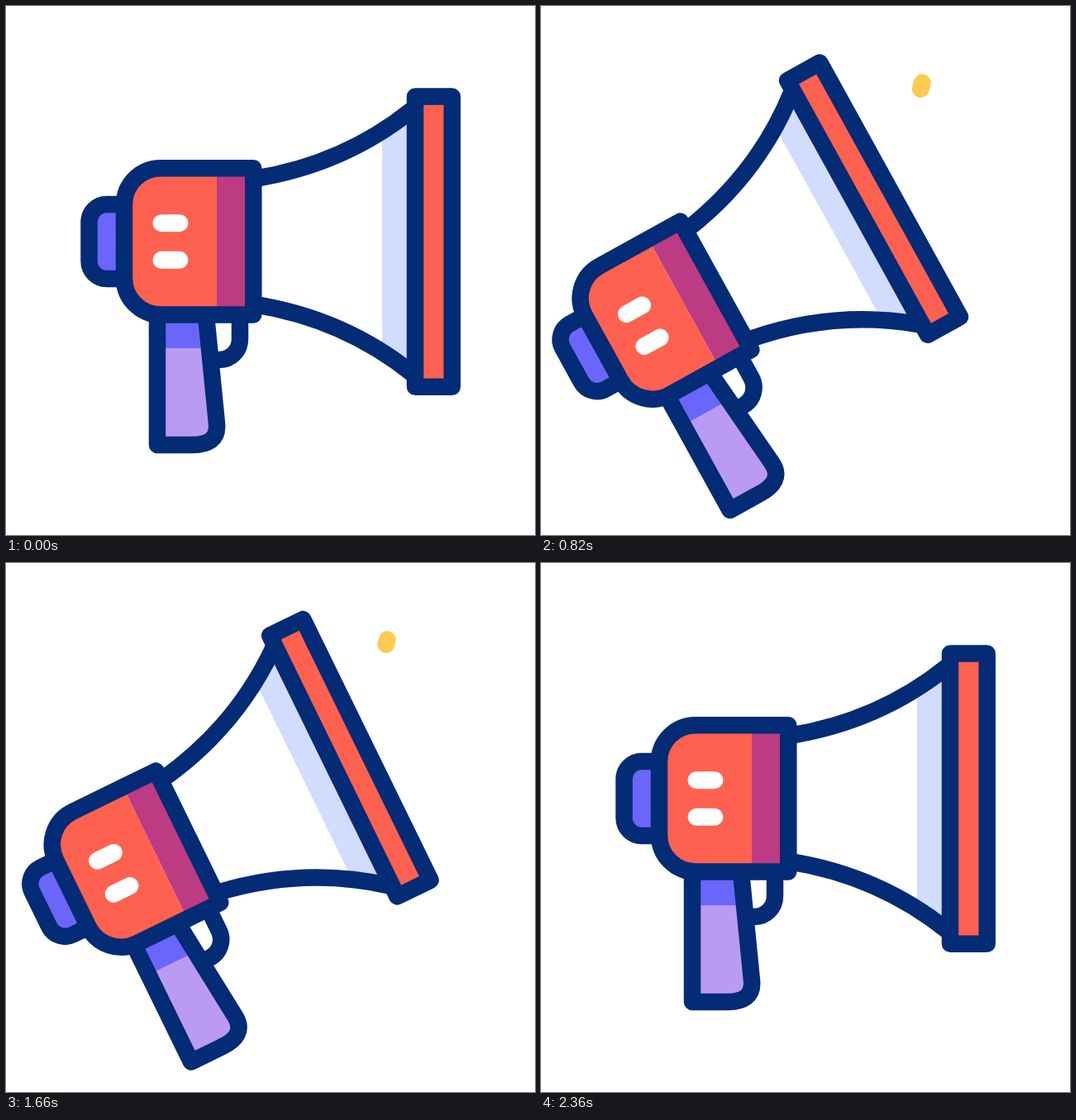
An HTML page for the animation above (2.4 s loop, 640x640 px).

```html
<!DOCTYPE html>
<html lang="en">
<head>
<meta charset="utf-8">
<title>Megaphone</title>
<style>
  html, body { margin: 0; width: 100%; height: 100%; overflow: hidden; background: #fff; }
  svg { display: block; width: 100%; height: 100%; }
  .line { fill: none; stroke: #042b75; stroke-width: 20.5; stroke-linejoin: round; }
  .ray { fill: none; stroke: #ffca50; stroke-width: 21; stroke-linecap: round; }
</style>
</head>
<body>
<svg viewBox="0 0 640 640">
  <defs>
    <clipPath id="grip">
      <path d="M183 374 V531 H226 C243 531 257 525 255 505 L242 374 Z"/>
    </clipPath>
    <clipPath id="cone">
      <path d="M300 209 C370 198 436 170 492 125 V445 C436 400 370 372 300 361 Z"/>
    </clipPath>
    <clipPath id="shell">
      <path d="M299.5 196 H187 A44 44 0 0 0 143 240 V329.5 A44 44 0 0 0 187 373.5 H299.5 Z"/>
    </clipPath>
  </defs>

  <path class="ray" d="M461.3 92.8 L446.5 149.5"/>
  <path class="ray" d="M494.5 227.3 L545.5 241"/>

  <g id="horn">
    <path class="line" d="M283 374 V403 C283 417 272 428 258 428 H250"/>
    <g clip-path="url(#grip)">
      <rect x="180" y="370" width="90" height="44" fill="#6b66fa"/>
      <rect x="180" y="414" width="90" height="120" fill="#bb9af3"/>
    </g>
    <path class="line" d="M242 374 L255 505 C257 525 243 531 226 531 H183 V374"/>

    <path class="line" style="fill:#6b66fa" d="M143 240 H122 A21.5 21.5 0 0 0 100.5 261.5 V308.5 A21.5 21.5 0 0 0 122 330 H143"/>

    <g clip-path="url(#cone)">
      <rect x="300" y="120" width="155" height="330" fill="#fff"/>
      <rect x="455" y="120" width="40" height="330" fill="#d2dcfd"/>
    </g>
    <path class="line" d="M300 209 C370 198 436 170 492 125 M300 361 C370 372 436 400 492 445"/>
    <rect class="line" style="fill:#ff6150" x="495" y="109.5" width="44.7" height="351.3"/>

    <g clip-path="url(#shell)">
      <rect x="140" y="190" width="115" height="190" fill="#ff6150"/>
      <rect x="255" y="190" width="50" height="190" fill="#bd3b83"/>
    </g>
    <path class="line" d="M299.3 196.2 H187 A44 44 0 0 0 143 240 V329.5 A44 44 0 0 0 187 373.5 H299.3 Z"/>
    <path d="M188 262.7 H210 M188 307.3 H210" stroke="#fff" stroke-width="21" stroke-linecap="round"/>
  </g>
</svg>
<script>
  const LOOP = 2400, TILT = 31.7;
  const UP = { start: 0, end: 1200 }, DOWN = { start: 1212, end: 2345 };
  const PULSE = { start: 784.5, step: 227, count: 4 };
  const horn = document.getElementById('horn');
  const rays = [...document.querySelectorAll('.ray')].map(el => ({ el, len: el.getTotalLength() }));
  const total = rays.reduce((sum, r) => sum + r.len, 0);

  const clamp = v => Math.min(1, Math.max(0, v));
  const smooth = u => u * u * (3 - 2 * u);
  const phase = (t, { start, end }) => (t - start) / (end - start);

  // cubic-bezier(.8, 0, .2, 1)
  function ease(x) {
    if (x <= 0) return 0;
    if (x >= 1) return 1;
    let lo = 0, hi = 1;
    for (let i = 0; i < 24; i++) {
      const m = (lo + hi) / 2, n = 1 - m;
      if (2.4 * n * n * m + 0.6 * n * m * m + m * m * m < x) lo = m;
      else hi = m;
    }
    return smooth((lo + hi) / 2);
  }

  const tiltAt = t => TILT * (ease(phase(t, UP)) - ease(phase(t, DOWN)));

  // The rays draw on and off twice
  function rayAt(t) {
    const p = (t - PULSE.start) / PULSE.step;
    if (p <= 0 || p >= PULSE.count) return 0;
    const u = smooth(p % 1);
    return Math.floor(p) % 2 ? 1 - u : u;
  }

  function draw(t) {
    const a = tiltAt(t);
    // The centre drifts along a shallow arc as the horn tilts
    const x = 320 - 2.34 * a - 0.0069 * a * a;
    const y = 320 + 0.8 * a + 0.019 * a * a;
    horn.setAttribute('transform', `translate(${x} ${y}) rotate(${-a}) translate(-320 -320)`);

    let left = rayAt(t) * total;
    for (const { el, len } of rays) {
      const part = clamp(left / len) * len;
      el.style.display = part > 0.05 ? '' : 'none';
      el.setAttribute('stroke-dasharray', `${part} 200`);
      left -= len;
    }
  }

  const begin = performance.now();
  function tick() {
    draw((performance.now() - begin) % LOOP);
    requestAnimationFrame(tick);
  }
  draw(0);
  requestAnimationFrame(tick);
</script>
</body>
</html>
```
